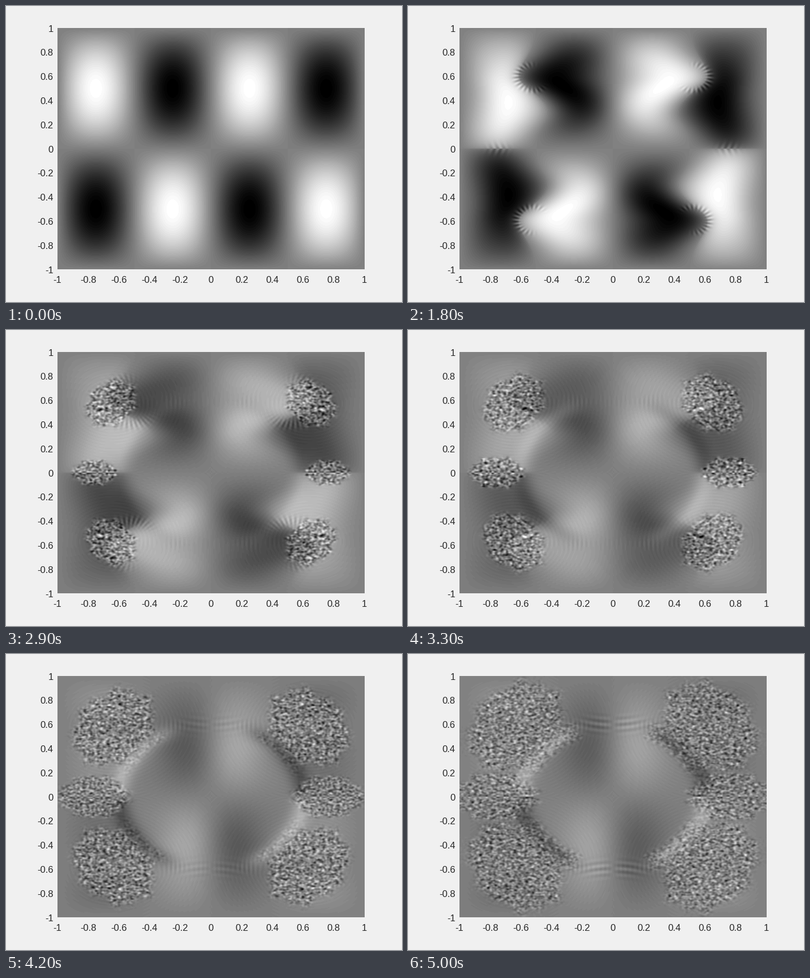
These frames come from a looping animation (700 px wide and 525 px high, 5100 ms). A matplotlib script:

```python
import numpy as np
import matplotlib.pyplot as plt
from matplotlib.animation import FuncAnimation

W, H, DPI = 700, 525, 100
STEP, FRAMES = 100, 51
NX, NY = 272, 214          # one quadrant; the rest follows by odd symmetry

x, y = np.meshgrid((np.arange(NX) + .5) / NX, (np.arange(NY) + .5) / NY)
radius, polar = np.hypot(x, y), np.degrees(np.arctan2(y, x))
wall = (1 - x ** 8) * (1 - y ** 8)      # zero at the outer edges


def bump(u, mid, width):
    return np.exp(-((u - mid) / width) ** 2)


def sigmoid(u):
    return 1 / (1 + np.exp(-np.clip(u, -40, 40)))


def ramp(t, start, end):
    return min(max((t - start) / (end - start), 0), 1)


def folded(t):
    """Cells of sin(2 pi x) sin(pi y) twisted about the quadrant's centre."""
    k = 1.45 / (1 + np.exp(-(t - 1700) / 300))
    k1 = min(k, 1)
    outer = sigmoid((x - .55) / .1)
    nose = bump(y, .6, np.where(y > .6, .2, .13))
    edge = .5 + k * (.135 * nose - .09 * bump(y, .3, .15))
    left = np.clip((edge - x) / edge, 0, 1)
    right = np.clip((x - edge) / (1 - edge), 0, 1)
    a = 1 - k * .3 * bump(y, .6, .15)
    b = 1 - k * (.12 + .32 * bump(y, .62, .2))
    across = np.sin(np.pi * left ** a) - np.sin(np.pi * right ** b)
    c = 1 + k * (.15 - .5 * outer - .08 * bump(x, .75, .12))
    up = np.maximum(np.sin(np.pi * y ** c), 0) ** (1 - .3 * k1 * outer)
    waist = 1 - .5 * k1 * bump(x, .97, .16) * bump(y, .45, .25)
    f = across * up * waist
    return f / np.abs(f).max()


def late_flow():
    """Bright inner lobe, dark arc and faint dark outer side."""
    u, v = x / .17, y / .42
    inner = u * v * np.exp(1 - .5 * (u * u + v * v))
    arc = bump(radius, .6, .065) * np.tanh(y / .02) * sigmoid((64 - polar) / 4)
    corner = .5 * bump(x, .75, .28) * bump(y, .85, .22)
    side = .35 * bump(x, .78, .2) * bump(y, .3, .2)
    return (.85 * inner - 1.1 * arc - corner - side) * wall


LATE = late_flow()


def grains(seed):
    """Band-limited noise of unit strength."""
    rng = np.random.default_rng(seed)
    fy, fx = np.fft.fftfreq(NY)[:, None], np.fft.rfftfreq(NX)[None, :]
    keep = np.exp(-2 * np.pi ** 2 * ((1.8 * fx) ** 2 + (1.4 * fy) ** 2))
    keep *= 1 - .8 * np.exp(-(fx ** 2 + fy ** 2) / .06 ** 2)
    spec = np.fft.rfft2(rng.standard_normal((NY, NX)))
    n = np.fft.irfft2(spec * keep, s=(NY, NX))
    return n / n.std()


def blob(cx, cy, rx, ry, tilt=0):
    c, s = np.cos(tilt), np.sin(tilt)
    u = ((x - cx) * c + (y - cy) * s) / rx
    v = ((y - cy) * c - (x - cx) * s) / ry
    phi = np.arctan2(v, u)
    lumps = 1 + .05 * np.sin(7 * phi) + .04 * np.sin(13 * phi + 1)
    return sigmoid((1 - np.hypot(u, v) / lumps) / .05)


def beads(t):
    """Short strokes along the folded front and the mid line."""
    grow = ramp(t, 1700, 2600)
    r0, wide = .1 + .09 * grow, .02 + .02 * grow
    dx, dy = x - .52, y - .59
    rho, phi = np.hypot(dx, dy), np.arctan2(dy, dx)
    arc = sigmoid((1.5 - phi) / .14) * sigmoid((phi + 2.2) / .14)
    ring = bump(rho, r0, wide) * arc * np.cos(phi * r0 * 210 + 25 * (rho - r0))
    row = bump(x, .75, .06 + .05 * grow) * bump(y, 0, .045)
    row = row * np.cos(150 * (x - .75) - 50 * y)
    return .45 * bump(t, 2300, 600) * (ring + .7 * row)


def ripples(t):
    """Fine waves running out of the rough patches."""
    d = np.hypot(x - .64, y - .57)
    rings = .04 * np.sin(2 * np.pi * d / .026) * np.exp(-d / .5)
    band = .06 * bump(y, .59, .05) * bump(x, .25, .2) * np.sin(210 * x)
    bow = np.sin(115 * (y - .5 - .8 * x * x)) * bump(y, .6, .07)
    bow = .13 * ramp(t, 3600, 5000) * bow * bump(x, .08, .12) * np.tanh(x / .03)
    return ramp(t, 1900, 3500) * (rings + band + bow) * wall


def roughen(f, t):
    """Patches of noise that spread like the square root of time."""
    s = ramp(t, 2100, 5000)
    size = np.sqrt(s) + 1e-3
    patch = np.maximum(
        blob(.67 - .04 * size, .575, .28 * size, .38 * size, .46),
        blob(.76, 0, .26 * size, .2 * size))
    reach = ramp(t, 3200, 5000)
    tail = (sigmoid((.075 * reach - np.abs(radius - .6)) / .012)
            * sigmoid((polar - 20) / 4)
            * sigmoid((50 + 17 * reach - polar) / 1.5))
    level = (.28 - .07 * s) * ramp(t, 2100, 2400)
    mask = np.maximum(patch, .75 * reach * tail)
    return f * (1 - .5 * patch) + level * mask * grains(t)


def field(t):
    amp = .28 + .72 * np.exp(-max(t - 1900, 0) / 1000)
    late = ramp(t, 2500, 4500)
    f = amp * ((1 - late) * folded(t) + late * LATE)
    f = f + beads(t) + ripples(t)
    if t > 2100:
        f = roughen(f, t)
    f = np.hstack([-f[:, ::-1], f])
    return np.vstack([-f[::-1], f])


def held(t):
    """The slow start moves in longer steps."""
    step = 300 if t < 1000 else 200 if t < 1600 else STEP
    return max(t - (t - 1000) % step, 0)


fig = plt.figure(figsize=(W / DPI, H / DPI), dpi=DPI, facecolor="#f0f0f0")
ax = fig.add_axes([.13, .11, .775, .815])
ax.axis("off")
image = ax.imshow(field(0), cmap=plt.get_cmap("gray", 64), vmin=-1, vmax=1,
                  origin="lower", extent=(-1, 1, -1, 1), aspect="auto",
                  interpolation="bilinear")

font = dict(family="Liberation Sans", size=12, color="#262626", va="baseline")
for n in range(-5, 6):
    label = f"{n / 5:g}"
    px, py = 362.3 + 54.25 * n, 253.4 - 42.8 * n
    fig.text(px / W, 1 - 491 / H, label, ha="center", **font)
    fig.text(83.5 / W, 1 - (py + 6.3) / H, label, ha="right", **font)


def draw(i):
    image.set_data(field(held(i * STEP)))
    return [image]


anim = FuncAnimation(fig, draw, frames=FRAMES, interval=STEP, repeat=True,
                     repeat_delay=0, blit=False)
plt.show()
```
